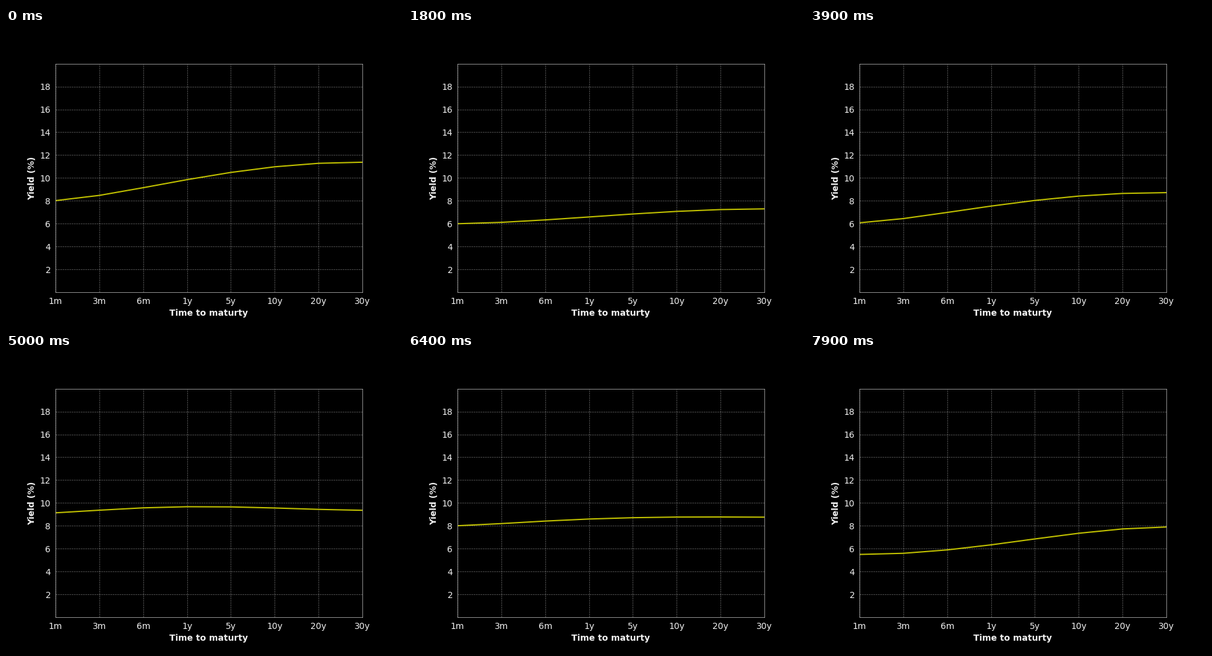
Write a matplotlib script that moves like this. It is 640x480 px and loops after 8 s.

```python
import numpy as np
import matplotlib.pyplot as plt
from matplotlib.animation import FuncAnimation

STEPS = 80
LABELS = ["1m", "3m", "6m", "1y", "5y", "10y", "20y", "30y"]
TEXT = "0.94"

# turning points: month, shortest yield, longest yield
ENDS = [
    (0, 8.02, 11.38), (2, 8.8, 11.85), (5, 7.2, 10.15), (9, 7.4, 10.25),
    (15, 6.2, 7.35), (18, 6.0, 7.3), (26, 5.6, 7.2), (28, 5.8, 8.6),
    (31, 6.23, 8.76), (33, 6.4, 9.5), (39, 6.08, 8.72), (50, 9.14, 9.36),
    (54, 8.1, 8.0), (59, 7.9, 7.85), (64, 8.01, 8.76), (68, 7.6, 8.9),
    (73, 6.1, 7.9), (79, 5.5, 7.9),
]
# month, height of the hump in the middle of the curve
HUMPS = [(0, 0.1), (20, -0.1), (28, 0.3), (39, 0.1),
         (50, 0.42), (54, -0.2), (64, 0.2), (79, -0.4)]

u = np.linspace(0, 1, len(LABELS))
RISE = np.sin(np.pi / 2 * u) ** 1.4
HUMP = np.abs(np.sin(np.pi * u ** 0.8)) ** 1.5


def sample(points, month):
    months, *series = zip(*points)
    return [np.interp(month, months, values) for values in series]


def curve(month):
    short, long = sample(ENDS, month)
    hump, = sample(HUMPS, month)
    return short + (long - short) * RISE + hump * HUMP


plt.style.use("dark_background")
plt.rcParams["font.family"] = "DejaVu Sans"

fig, ax = plt.subplots(figsize=(6.4, 4.8), dpi=100)
ax.set_xlim(0, 7)
ax.set_ylim(0, 20)
ax.set_xticks(range(8), LABELS)
ax.set_yticks(range(2, 20, 2))
ax.set_xlabel("Time to maturty", fontweight="bold", color=TEXT)
ax.set_ylabel("Yield (%)", fontweight="bold", color=TEXT)
ax.grid(linestyle="--", linewidth=0.5, color="white", alpha=0.45)
ax.tick_params(length=2, width=0, labelcolor=TEXT)
for spine in ax.spines.values():
    spine.set(linewidth=0.5, edgecolor="0.8")

line, = ax.plot(range(8), curve(0), color="y", linewidth=1.5)


def update(month):
    line.set_ydata(curve(month))
    return line,


anim = FuncAnimation(fig, update, frames=STEPS, interval=100,
                     repeat=True, repeat_delay=0)
plt.show()
```
